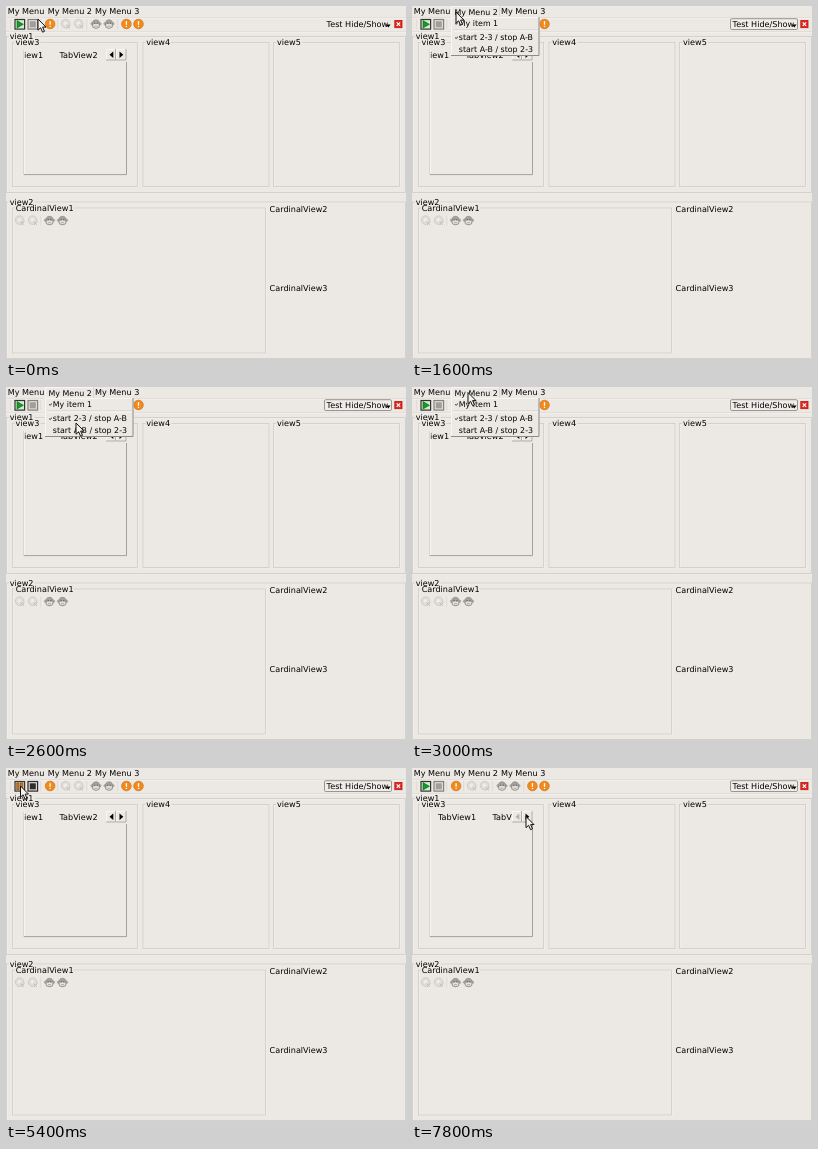
Recreate the animation shown at these times as an HTML page. Size 400 px wide and 353 px high, loop 8 s.

```html
<!DOCTYPE html>
<html lang="en">
<head>
<meta charset="utf-8">
<title>View layout demo</title>
<style>
  html, body { margin: 0; width: 100%; height: 100%; overflow: hidden; background: #ece8e4; }
  svg { display: block; width: 100%; height: 100%; }
  text { font: 8.1px "DejaVu Sans", sans-serif; fill: #000; text-rendering: geometricPrecision; white-space: pre; }
  .popup text { font-size: 7.9px; }
</style>
</head>
<body>
<svg id="stage" viewBox="0 0 400 353"></svg>
<script>
const LOOP = 8000, STEP = 200, BG = '#ece8e4';

const rect = (x, y, w, h, fill, stroke = 'none', extra = '') =>
  `<rect x="${x}" y="${y}" width="${w}" height="${h}" fill="${fill}" stroke="${stroke}" ${extra}/>`;
const path = (d, fill, stroke = 'none', width = 1) =>
  `<path d="${d}" fill="${fill}" stroke="${stroke}" stroke-width="${width}"/>`;
const line = (d, color, width = 1) => path(d, 'none', color, width);
const circle = (x, y, r, fill, stroke = 'none', width = 1) =>
  `<circle cx="${x}" cy="${y}" r="${r}" fill="${fill}" stroke="${stroke}" stroke-width="${width}"/>`;
const label = (x, y, s) => `<text x="${x}" y="${y}">${s}</text>`;
const group = (id, body, extra = '') => `<g id="${id}" ${extra}>${body}</g>`;
const at = (x, y, body) => `<g transform="translate(${x} ${y})">${body}</g>`;

// Raised panel: light top and left edges, dark bottom and right edges
const raised = (x, y, w, h, dark = '#8f8a85') =>
  rect(x, y, w, h, BG) +
  line(`M${x + .5} ${y + h}V${y + .5}H${x + w}`, '#f8f6f4') +
  line(`M${x} ${y + h - .5}H${x + w - .5}V${y}`, dark);

// Etched frame whose title interrupts the top edge
function frame(title, x, y, w, h, textX, baseline, textWidth) {
  return rect(x + 1.2, y + 1.2, w, h, 'none', '#f3f0ed', 'stroke-width=".7"') +
    rect(x + .5, y + .5, w, h, 'none', '#cfcbc7', 'stroke-width=".8"') +
    rect(textX - 1, y - 1, textWidth + 2, 3.5, BG) + label(textX, baseline, title);
}

const gear = (x, y) => at(x, y,
  circle(-.4, -.4, 4.3, '#e0dcd8', '#cbc7c3', .8) + circle(-.6, -.6, 1.8, '#efecea') +
  line('M.4 .8L4 4.4M1 4.4L4.4 1', '#c2beba', 1));

const monkey = (x, y) => at(x, y,
  circle(-4, -.2, 1.2, '#bab6b2', '#8f8b88', .5) + circle(4, -.2, 1.2, '#bab6b2', '#8f8b88', .5) +
  path('M-3.7 0C-4-5.6 4-5.6 3.7 0L3.2 3.2Q0 5.6 -3.2 3.2Z', '#a5a19e', '#84807d', .6) +
  path('M-3 .6Q0-1 3 .6L2.5 3Q0 4.6 -2.5 3Z', '#e4e1de') +
  circle(-1.3, -.8, .6, '#5f5c5a') + circle(1.3, -.8, .6, '#5f5c5a') + line('M-1.5 2.2H1.5', '#8a8683', .6));

const warning = (x, y) => at(x, y,
  circle(0, 0, 4.8, '#f08a1c', '#cf7418', .7) +
  line('M0-2.8V.8', '#fff', 1.3) + circle(0, 2.4, .7, '#fff'));

const separator = (x, y) => line(`M${x} ${y - 5}V${y + 5}`, '#d2ceca', .8) + line(`M${x + 1} ${y - 5}V${y + 5}`, '#f4f2f0', .8);

const iconBox = (x, fill, stroke) => rect(x, 13.5, 9.6, 9.6, fill, stroke, 'stroke-width="1.2"');
const playIcon = iconBox(9, '#d8ead2', '#2f342c') + path('M11 14.6L17.4 18.3L11 22Z', '#14992b', '#08671a', .6);
const pauseIcon = iconBox(9, '#e4cfb4', '#3a332c') +
  rect(10.8, 14.9, 2.3, 6.8, '#c87521', '#6b4520', 'stroke-width=".6"') +
  rect(14.6, 14.9, 2.3, 6.8, '#c87521', '#6b4520', 'stroke-width=".6"');
const stopIdle = iconBox(22, '#dedad6', '#85817d') + rect(23.8, 15.3, 6, 6, '#a19d99');
const stopActive = iconBox(22, '#dcd8d4', '#2c2a28') + rect(23.8, 15.3, 6, 6, '#2f2d2b');

const toolbar =
  line('M0 11.5H400M0 25.5H400', '#dedad6', .8) + line('M0 12.4H400M0 26.4H400', '#f4f1ee', .8) +
  separator(5, 18) + separator(35, 18) + separator(52, 18) + separator(81, 18) + separator(112, 18) +
  warning(44.1, 18) + gear(60, 18) + gear(73, 18) + monkey(90, 18) + monkey(103, 18) +
  warning(120.4, 18) + warning(132.5, 18);

const closeButton = rect(388.8, 14.5, 7.2, 7.2, '#e3261f', '#b81a14', 'stroke-width=".8"') +
  line('M390.7 16.4l3.4 3.4m0-3.4l-3.4 3.4', '#fff', 1.2);

const tabLabels = label(26, 52, 'TabView1') + label(80.5, 52, 'TabView2');

const tabFolder =
  line('M17.7 44V169', '#cfcbc7', .8) + line('M18.6 44V168', '#fbfaf8', .8) +
  line('M18 168.6H120.5V56', '#9d9893', .9) +
  group('clipped', group('tabs', tabLabels), 'clip-path="url(#tabClip)"') +
  raised(100, 43, 10, 11.5, '#b0aba6') + raised(110, 43, 10.5, 11.5, '#b0aba6') +
  '<path id="leftArrow" d="M107.3 45.5V52.1L103.5 48.8Z"/>' + path('M113.5 45.5V52.1L117.3 48.8Z', '#000');

const check = y => line(`M43 ${y - 2.7}l1.1 1 1.9-1.8`, '#222', .9);
const etched = (x1, x2, y) => line(`M${x1} ${y}H${x2}`, '#c9c5c0', .8) + line(`M${x1} ${y + .9}H${x2}`, '#fff', .8);

const menuOne = raised(0, 11, 84, 81) +
  [20, 34, 45.8, 57.4, 69, 80.6].map((y, i) => label(8, y, `My item ${i + 1}`)).join('') + etched(2, 82, 24);
const menuTwo = raised(39, 0, 49, 12, '#dad6d2') + label(42.5, 8.9, 'My Menu 2') +
  raised(39, 11, 88.5, 39) + check(20) + label(46.8, 20.2, 'My item 1') + etched(41, 126, 24) +
  check(34.2) + label(46.8, 34.4, 'start 2-3 / stop A-B') + label(46.8, 45.8, 'start A-B / stop 2-3');

const arrowCursor = path('M0 0V11.2L2.6 8.8L4.6 13.2L6.5 12.3L4.6 8.1H8Z', '#f4f2f0', '#111', 1);

const stage = document.getElementById('stage');
stage.innerHTML =
  '<defs><clipPath id="tabClip"><rect x="18.4" y="42" width="81.6" height="15"/></clipPath></defs>' +
  rect(0, 0, 400, 353, BG) + toolbar +
  group('titleBox', raised(0, 0, 39, 11.5, '#b5b0ab')) +
  label(1.7, 8.3, 'My Menu') + label(41.7, 8.3, 'My Menu 2') + label(89, 8.3, 'My Menu 3') +
  group('play', playIcon) + group('pause', pauseIcon) +
  group('stopOff', stopIdle) + group('stopOn', stopActive) +
  group('combo', rect(318.5, 12.7, 67, 10.8, '#efece9', '#918c87', 'rx="1.3" stroke-width=".9"')) +
  label(320.6, 21.1, 'Test Hide/Show') + path('M380 18.6H384.6L382.3 21.4Z', '#000') + closeButton +
  frame('view1', 0, 30, 399, 156, 3.7, 33.3, 24) +
  frame('view3', 6, 36, 125, 144, 9.5, 38.8, 24) +
  frame('view4', 136.5, 36, 126, 144, 140.3, 38.8, 24) +
  frame('view5', 267, 36, 126, 144, 271, 38.8, 24) +
  tabFolder +
  frame('view2', 0, 195.5, 399, 156.5, 3.7, 198.8, 24) +
  frame('CardinalView1', 6, 201.5, 253, 145, 9.7, 204.8, 57) +
  gear(14, 214.5) + gear(27, 214.5) + separator(35, 214.5) + monkey(43.5, 214.5) + monkey(56.5, 214.5) +
  label(263.6, 206, 'CardinalView2') + label(263.6, 285.3, 'CardinalView3') +
  group('menuOne', menuOne, 'class="popup"') + group('menuTwo', menuTwo, 'class="popup"') +
  group('cursor', arrowCursor);

const part = id => document.getElementById(id);
const show = (id, on) => part(id).setAttribute('visibility', on ? 'visible' : 'hidden');
const move = (id, x, y) => part(id).setAttribute('transform', `translate(${x} ${y})`);

// Pointer stops: [time, x, y]
const pointer = [
  [0, 32, 13], [200, 23.5, 5], [1600, 44, 6], [1800, 68.5, 4], [2000, 70, 14], [2200, 71, 25],
  [2400, 71, 32], [2600, 70, 36], [3000, 56, 5.5], [3400, 53, 8], [3600, 53, 13], [3800, 54, 17],
  [4000, 53, 30], [4400, 48, 44], [4600, 40, 57], [4800, 30, 46], [5000, 22, 31], [5200, 16, 20],
  [5400, 14.5, 18], [6000, 20, 18], [6200, 26, 18], [6600, 50, 26], [6800, 84, 38],
  [7000, 106, 48], [7800, 114, 48.5]
];

function draw(ms) {
  const t = Math.floor((ms % LOOP) / STEP) * STEP;
  const during = (from, to) => t >= from && t < to;
  const [, x, y] = pointer.filter(p => p[0] <= t).pop();
  const running = during(5400, 6400), scrolledBack = t >= 7200;

  move('cursor', x, y);
  show('titleBox', during(200, 1600));
  show('menuOne', during(1000, 1600));
  show('menuTwo', during(1600, 3600));
  show('combo', t >= 800);
  show('play', !running);
  show('pause', running);
  show('stopOff', !running);
  show('stopOn', running);
  move('tabs', scrolledBack ? 0 : -27, 0);
  part('leftArrow').setAttribute('fill', scrolledBack ? '#b5b0ab' : '#000');
}

const start = performance.now();
function tick() {
  draw(performance.now() - start);
  requestAnimationFrame(tick);
}
tick();
</script>
</body>
</html>
```
